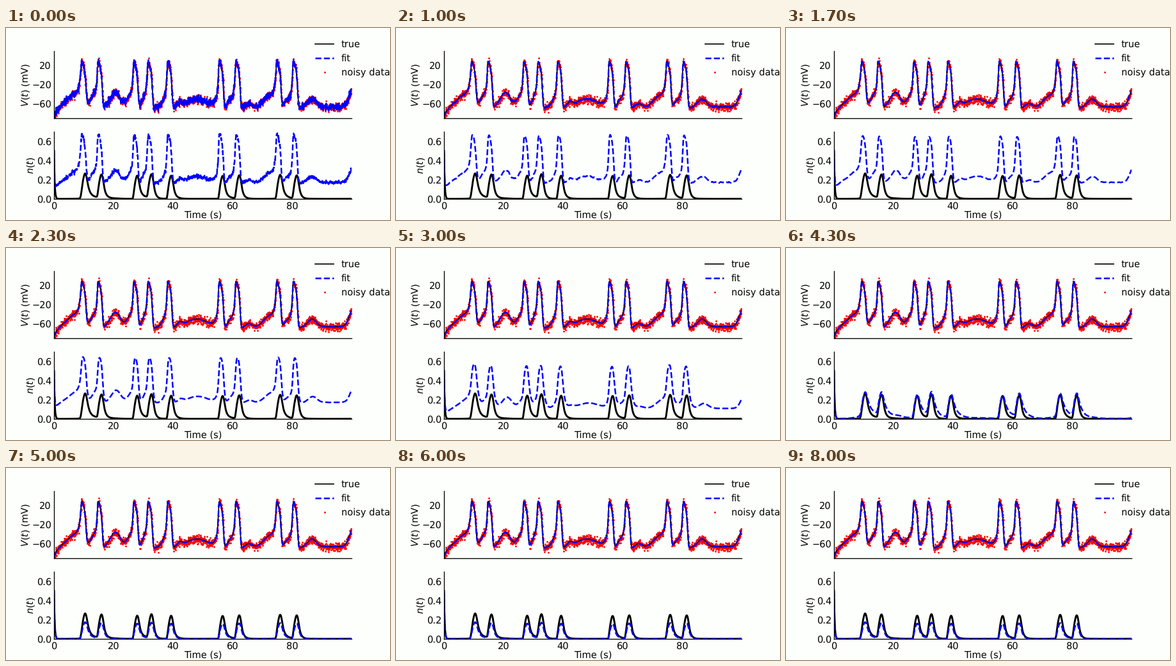
A matplotlib script that plays this animation: 600 px wide and 300 px high, repeating every 8.3 s.

```python
import numpy as np
import matplotlib.pyplot as plt
from matplotlib.animation import FuncAnimation

plt.rcParams.update({"font.family": "DejaVu Sans", "font.size": 7,
                     "mathtext.fontset": "dejavusans", "text.hinting": "none",
                     "axes.linewidth": 0.65})

FRAMES, INTERVAL = 83, 100          # ten ticks per second
STEPS = 25                          # fitting iterations, three per second
BACK = "#fdfffc"

REST = -66                          # resting voltage (mV)
SPIKES = [9.4, 14.9, 26.9, 31.7, 38.3, 55.6, 61.2, 74.95, 80.5]
# Slow swings between the spikes: centre (s), width (s), height (mV)
SWINGS = [(7.5, 3, 25), (13.3, .8, 14), (20.6, 1.7, 30), (25.2, .9, 14),
          (30.3, 1, 13), (36.9, .8, 8), (42.3, .8, 7), (48, 3.5, 16),
          (59.3, 1, 12), (65.4, 1, 7), (72.5, 2, 22), (78.3, 1, 11),
          (86.7, 1.4, 16), (100.5, 1.3, 36)]

# Gate parameters while fitting: step, midpoint, slope, time constant, peak
STAGES = np.array([(0, 0, 83, .06, .685),
                   (7, 0, 83, .30, .645),
                   (11, 0, 45, 1.25, .50),
                   (14, 2, 14, 4.0, .175)])


def sigmoid(x):
    return 0.5 * (1 + np.tanh(x / 2))


def voltage(t):
    base = REST - 22 * np.exp(-t / 1.3)
    for mid, width, height in SWINGS:
        base += height * np.exp(-((t - mid) / width) ** 2 / 2)
    for peak in SPIKES:
        d = t - peak
        ramp = 30 * np.exp((np.minimum(d, -0.5) + 0.7) / 0.7)
        dip = -8 * np.exp(-(np.maximum(d, 1.4) - 1.4) / 0.8)
        base += np.where(d < 0, ramp, dip)
    v = base
    for peak in SPIKES:
        d = t - peak
        pulse = sigmoid((d + 0.35) / 0.1) * sigmoid((1.4 - d) / 0.17)
        v = v + pulse * (31 - 22 * np.maximum(d, 0) - v)
    return v


def gate(t, v, mid, slope, tau, peak):
    """Gating variable driven by the voltage, starting from 0.5."""
    target = 0.5 * (1 + np.tanh((v - mid) / slope))
    rate = np.cosh((v - mid) / (2 * slope)) / tau
    mix = 1 - np.exp(-rate * (t[1] - t[0]))
    n = np.empty_like(v)
    x = target[0]
    for i in range(len(v)):
        x += (target[i] - x) * mix[i]
        n[i] = x
    n *= peak / n.max()
    start = np.exp(-t / min(tau, 0.22))
    return n + (0.5 - n[0]) * start


def fit(step):
    fade = 0.85 * max(0, 1 - (step / 8) ** 2)
    size = 1 + 2 * step
    smooth = np.convolve(noise, np.ones(size) / size, mode="same")
    v = true_v + fade * smooth
    params = [np.interp(step, STAGES[:, 0], col) for col in STAGES[:, 1:].T]
    return v, gate(t, v, *params)


t = np.arange(0, 100, 0.05)
true_v = voltage(t)
true_n = gate(t, true_v, 2, 14, 4.0, 0.265)
noise = np.random.default_rng(4).normal(0, 4.3, len(t))
fits = [fit(step) for step in range(STEPS)]

fig, (ax_v, ax_n) = plt.subplots(2, 1, figsize=(4, 2), dpi=150, facecolor=BACK)
fig.subplots_adjust(left=.125, right=.9, bottom=.11, top=.88, hspace=.2)
for ax in (ax_v, ax_n):
    ax.set_facecolor(BACK)
    ax.set_xlim(0, 100)
    ax.spines[["top", "right"]].set_visible(False)
    ax.tick_params(length=0, pad=2)

ax_v.set_ylim(-90, 50)
ax_v.set_xticks([])
ax_v.set_yticks([-60, -20, 20])
ax_v.set_ylabel("$V(t)$ (mV)", labelpad=0)
ax_n.set_ylim(0, 0.7)
ax_n.set_xticks([0, 20, 40, 60, 80])
ax_n.set_yticks([0, .2, .4, .6])
ax_n.set_ylabel("$n(t)$", labelpad=0)
ax_n.set_xlabel("Time (s)", labelpad=0)

dots, = ax_v.plot(t, true_v + noise, "o", color="r", ms=1.35, mew=0)
line_v, = ax_v.plot(t, true_v, "k", lw=.8)
fit_v, = ax_v.plot([], [], "b--", lw=1.2)
ax_n.plot(t, true_n, "k", lw=1.4)
fit_n, = ax_n.plot([], [], "b--", lw=1.2)

ax_v.legend([line_v, fit_v, dots], ["true", "fit", "noisy data"],
            loc="upper left", frameon=False, borderaxespad=0,
            bbox_to_anchor=(477.2 / 600, 1 - 12.8 / 300),
            bbox_transform=fig.transFigure)


def draw(tick):
    v, n = fits[min((3 * tick + 1) // 10, STEPS - 1)]
    fit_v.set_data(t, v)
    fit_n.set_data(t, n)
    return fit_v, fit_n


anim = FuncAnimation(fig, draw, frames=FRAMES, interval=INTERVAL,
                     init_func=lambda: draw(0), repeat=True,
                     cache_frame_data=False)
plt.show()
```
